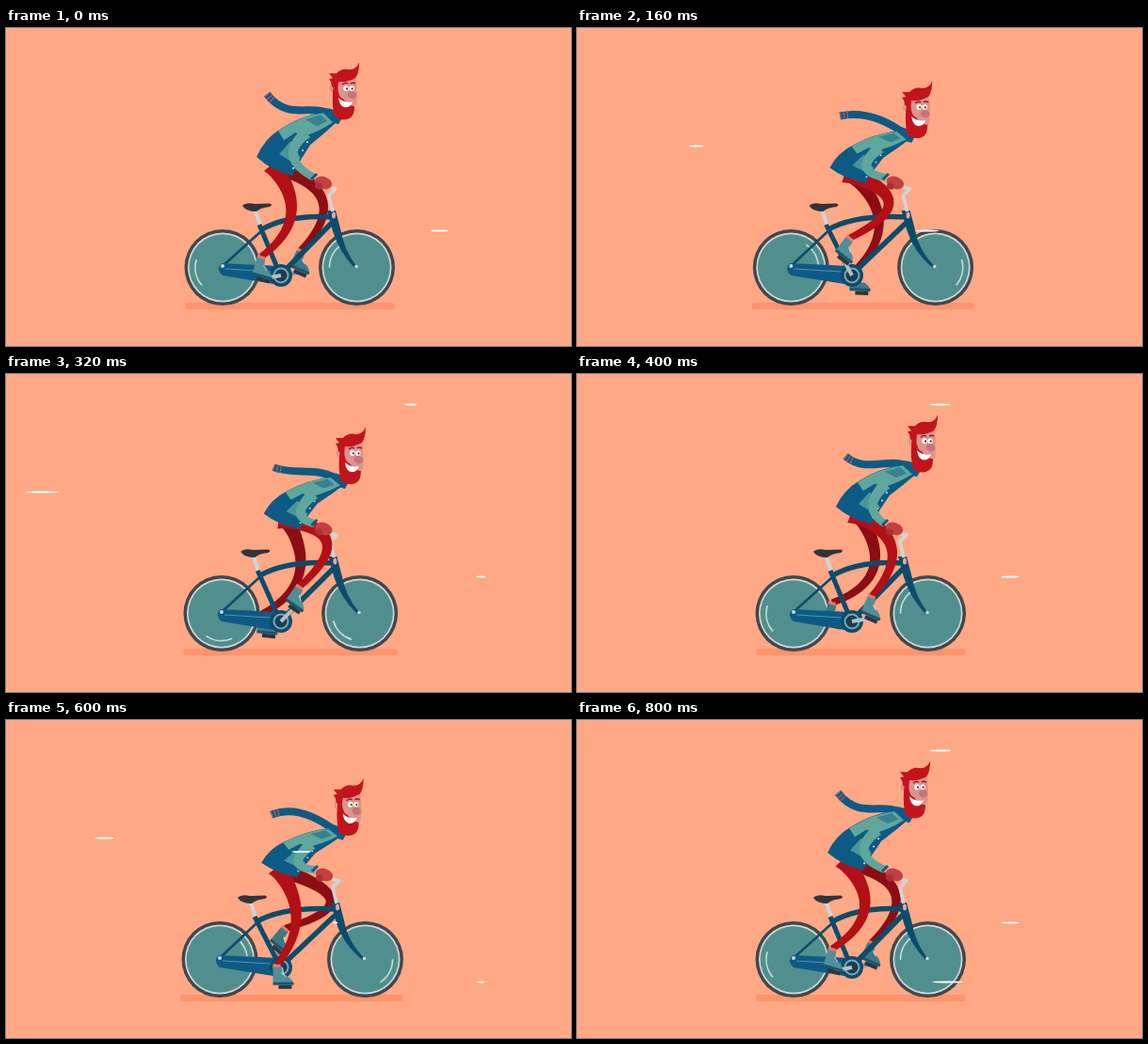
An HTML page with a canvas that plays this animation: 600 px wide and 338 px high, repeating every 840 ms.

```html
<!DOCTYPE html>
<html lang="en">
<head>
<meta charset="utf-8">
<title>Cyclist</title>
<style>
html, body { margin: 0; width: 100%; height: 100%; overflow: hidden; background: #ffa885; }
canvas { display: block; }
</style>
</head>
<body>
<canvas id="stage" width="600" height="338"></canvas>
<script>
const ctx = document.getElementById('stage').getContext('2d');
const LOOP = 840, STEP = 40, TAU = Math.PI * 2, DEG = Math.PI / 180;
const BLUE = '#0d5a85', NAVY = '#0c4c6b', TEAL = '#5fa69c', RED = '#c3141b', PALE = '#cfd6d6';

// Streaks: birth time, height, x at birth
const streaks = [[-130, 215.5, 532], [270, 215.5, 532], [670, 215.5, 532], [240, 32.5, 474],
  [640, 32.5, 474], [60, 125.5, 182], [460, 125.5, 182], [460, 140, 391], [560, 278.5, 526]];

function fill(shape, color) {
  ctx.fillStyle = color;
  ctx.fill(typeof shape === 'string' ? new Path2D(shape) : shape);
}
function line(d, color, width) {
  ctx.strokeStyle = color;
  ctx.lineWidth = width;
  ctx.stroke(new Path2D(d));
}
function oval(x, y, rx, ry, color, turn = 0) {
  const p = new Path2D();
  p.ellipse(x, y, rx, ry, turn, 0, TAU);
  fill(p, color);
}
function group(draw, x, y, turn = 0, sy = 1) {
  ctx.save();
  ctx.translate(x, y);
  ctx.rotate(turn);
  ctx.scale(1, sy);
  draw();
  ctx.restore();
}

// Tapered limb bending smoothly through its joint
function limb(a, joint, b, w0, w1, color) {
  const c = [0, 1].map(i => 2 * joint[i] - (a[i] + b[i]) / 2);
  const left = [], right = [];
  for (let i = 0; i <= 20; i++) {
    const u = i / 20, v = 1 - u;
    const at = k => v * v * a[k] + 2 * u * v * c[k] + u * u * b[k];
    const slope = k => v * (c[k] - a[k]) + u * (b[k] - c[k]);
    const dx = slope(0), dy = slope(1), n = (w0 + (w1 - w0) * Math.sqrt(u)) / 2 / Math.hypot(dx, dy);
    left.push([at(0) + dy * n, at(1) - dx * n]);
    right.unshift([at(0) - dy * n, at(1) + dx * n]);
  }
  fill('M' + left.concat(right).join('L') + 'Z', color);
}

function wheel(x, glint) {
  const y = 254.5;
  oval(x, y, 40.5, 40.5, '#41474c');
  oval(x, y, 37, 37, PALE);
  oval(x, y, 35.3, 35.3, '#518f8e');
  ctx.beginPath();
  ctx.arc(x, y, 29, glint - 0.5, glint + 0.5);
  ctx.strokeStyle = '#c3dedb';
  ctx.lineWidth = 1.7;
  ctx.stroke();
}

function leg(hip, angle, near) {
  const px = 292 + 20 * Math.cos(angle), py = 263 + 20 * Math.sin(angle);
  const tilt = (20 - 20 * Math.sin(angle)) * DEG;
  const cos = Math.cos(tilt), sin = Math.sin(tilt);
  const ankle = [px - 8 * cos + 22 * sin, py - 8 * sin - 22 * cos];
  const dx = ankle[0] - hip[0], dy = ankle[1] - hip[1], d = Math.hypot(dx, dy);
  const bulge = Math.sqrt(Math.max(9, 56 * 56 - d * d / 4));
  const knee = [(hip[0] + ankle[0]) / 2 + dy / d * bulge, (hip[1] + ankle[1]) / 2 - dx / d * bulge];

  line(`M292 263L${px} ${py}`, near ? '#b5c0c2' : '#7f9298', 4);
  limb(hip, knee, ankle, near ? 21 : 17, 7, near ? '#b30f16' : '#8c0d13');
  group(() => {
    fill('M-6 -1H8V3H-6Z', '#2b353b');
    fill('M-12 -21L-3 -21L-2 -12Q7 -10 10 -3L-12 -3Z', near ? '#4f8f98' : '#3f7884');
    fill('M-12 -4H10V-1H-12Z', '#1c5470');
    fill('M-12 -23H-4V-20H-12Z', '#e27a6c');
    line('M-3 -14L2 -10', PALE, 1);
  }, px, py, tilt);
}

function bike(s) {
  const rear = 230 - 3 * s, front = 372 + 8.5 * s, seat = 267 - 5 * s, head = 346 + 4 * s;
  const joint = seat + 4;
  line(`M${rear} 253L${joint} 216`, NAVY, 2.6);
  line(`M${seat - 2} 195L${joint} 212`, PALE, 4);
  line(`M${joint - 2} 209L291 262`, NAVY, 5);
  line(`M${joint - 1} 215Q${joint + 28} 198 ${head} 201`, NAVY, 5.5);
  line(`M294 260L${head} 207`, NAVY, 5.5);
  fill(`M${head - 5} 194L${head + 4} 194L${head + 9} 213Q${head + 13} 236 ${front} 253
    L${front - 2} 255Q${head + 8} 238 ${head + 1} 216Z`, NAVY);
  line(`M${head + 1} 195L${head - 3} 178L${head + 4} 171L${head - 4} 169`, PALE, 3.5);
  oval(head + 2, 199, 2, 3.5, '#e9a5a6');
  fill(`M${seat - 16} 189Q${seat - 12} 185 ${seat - 3} 187L${seat + 13} 186.5Q${seat + 17} 188 ${seat + 13} 190
    Q${seat + 3} 191 ${seat - 1} 195Q${seat - 12} 195 ${seat - 16} 189Z`, '#30343b');
  // Chain guard
  fill(`M${rear - 1} 250L290 253A10 10 0 0 1 290 273L${rear} 263Q${rear - 8} 256 ${rear - 1} 250Z`, BLUE);
  line(`M${rear + 3} 256L281 259`, '#5590a8', 1.2);
  oval(rear, 253, 2, 2, PALE);
  oval(front, 253.5, 1.8, 1.8, PALE);
  oval(292, 263, 12, 12, NAVY);
  oval(292, 263, 8.5, 8.5, '#7fa3ae');
  oval(292, 263, 6.5, 6.5, '#163f54');
}

function jacket() {
  fill('M266 -13Q274 -32 290 -42Q312 -57 338 -61L353 -52Q338 -38 323 -26Q312 -10 304 7Q282 2 266 -13Z', BLUE);
  fill('M289 -41Q312 -57 337 -60L347 -50Q334 -41 319 -36L307 -39L295 -31Z', TEAL);
  fill('M318 -53L334 -58L341 -51L330 -46Z', '#37808f');
  fill('M290 -16L302 -30L313 -12L306 -6Z', '#4c949a');
  for (const [x, y] of [[320, -29], [315, -20], [310, -11], [305, -1]]) oval(x, y, 1, 1, '#e3efee');
}

function scarf(x, y, curl, drop) {
  const tip = [x - 69, y + drop];
  const d = `M${x + 2} ${y + 3}C${x - 20} ${y - 14} ${x - 45} ${y + curl} ${tip}`;
  line(d, BLUE, 8);
  ctx.setLineDash([1.2, 2.5, 1.2, 2.5, 1.2, 200]);
  line(`M${tip}C${x - 45} ${y + curl} ${x - 20} ${y - 14} ${x} ${y}`, '#a9606c', 7);
  ctx.setLineDash([]);
  fill(`M${x - 10} ${y - 6}Q${x + 4} ${y - 7} ${x + 11} ${y + 4}L${x + 7} ${y + 11}Q${x - 2} ${y + 9} ${x - 10} ${y + 1}Z`, BLUE);
}

function face() {
  fill('M347 52L371 50Q374 64 372 82L352 86Q346 70 347 52Z', '#dd938b');
  oval(347, 64, 3.2, 4.5, '#dd938b');
  fill('M347 68Q346 84 349 94Q358 100 366 95Q370 92 370 83Q362 82 358 75Q353 74 352 62L348 60Z', RED);
  fill('M346 62L345 57L343 54L347 53L343 48L351 48Q356 42 365 44Q372 44 375 36Q375 48 371 53Q362 58 353 57L352 66Z', RED);
  fill('M353 74Q360 80 368 78Q366 85 359 84Q354 82 353 74Z', '#fff');
  oval(361, 64, 2.8, 3, '#fff');
  oval(367, 64, 2.6, 2.8, '#fff');
  oval(362, 64.3, 1, 1.2, '#34343a');
  oval(367.6, 64.3, 1, 1.2, '#34343a');
  line('M357 60Q360 57 363 59M366 59Q368 57 371 59', '#a3141a', 1.4);
  oval(367.5, 71, 4.8, 4, '#c9727c', 0.3);
}

function draw(t) {
  const beat = TAU * t / 400;
  const stretch = (1 - Math.cos(beat)) / 2;
  const settle = 7 * Math.max(0, 1 - t / 80);
  const dip = 5 + 11.5 * (1 - Math.cos(beat - TAU * 0.1)) - settle;
  const sway = 4.5 * (1 - Math.cos(TAU * (t - 20) / 800));
  const hipY = 150 + 0.45 * dip, squash = 1 - 0.55 * dip / 60;
  const body = (x, y) => [x + sway, hipY + (y - 150) * squash];
  const crank = 170 * DEG + TAU * t / 800;
  const spin = 208 * DEG + beat + 0.6 * Math.max(0, Math.sin(beat));

  fill('M0 0H600V338H0Z', '#ffa885');
  ctx.lineCap = 'round';
  ctx.lineJoin = 'round';
  line(`M${193.5 - 5 * stretch} 295.5H${409.5 + 9 * stretch}`, '#ff946c', 7);
  ctx.lineCap = 'butt';

  wheel(230 - 3 * stretch, spin - 40 * DEG);
  wheel(372.5 + 9 * stretch, spin);
  leg([293 + sway, hipY], crank + Math.PI, false);
  bike(stretch);
  leg([282 + sway, hipY - 5], crank, true);

  scarf(346 + sway * 0.9, 91 + dip, -8 + 18 * Math.cos(beat), -16 - 5 * Math.cos(TAU * t / 800));
  group(jacket, sway, hipY, 0, squash);
  const hand = 337 + stretch, elbow = body(305, 136);
  limb(body(319, 111), elbow, [hand - 10, 159], 13, 8, TEAL);
  line(`M${hand - 13} 161L${hand - 7} 155`, BLUE, 3);
  oval(hand, 164.5, 9.5, 6.5, '#c33f41', 0.35);
  oval(hand - 5, 168, 4, 3.5, '#ab2f35', 0.5);
  group(face, sway * 0.9, dip);

  for (const [born, y, x] of streaks) {
    const age = t - born;
    const w = Math.min(4 + 0.12 * age, (340 - age) / 2);
    if (age <= 0 || w <= 0) continue;
    oval(x - 0.552 * age, y, w / 2, 0.9, '#fff');
  }
}

function tick() {
  draw(Math.floor(performance.now() % LOOP / STEP) * STEP);
  requestAnimationFrame(tick);
}
tick();
</script>
</body>
</html>
```
